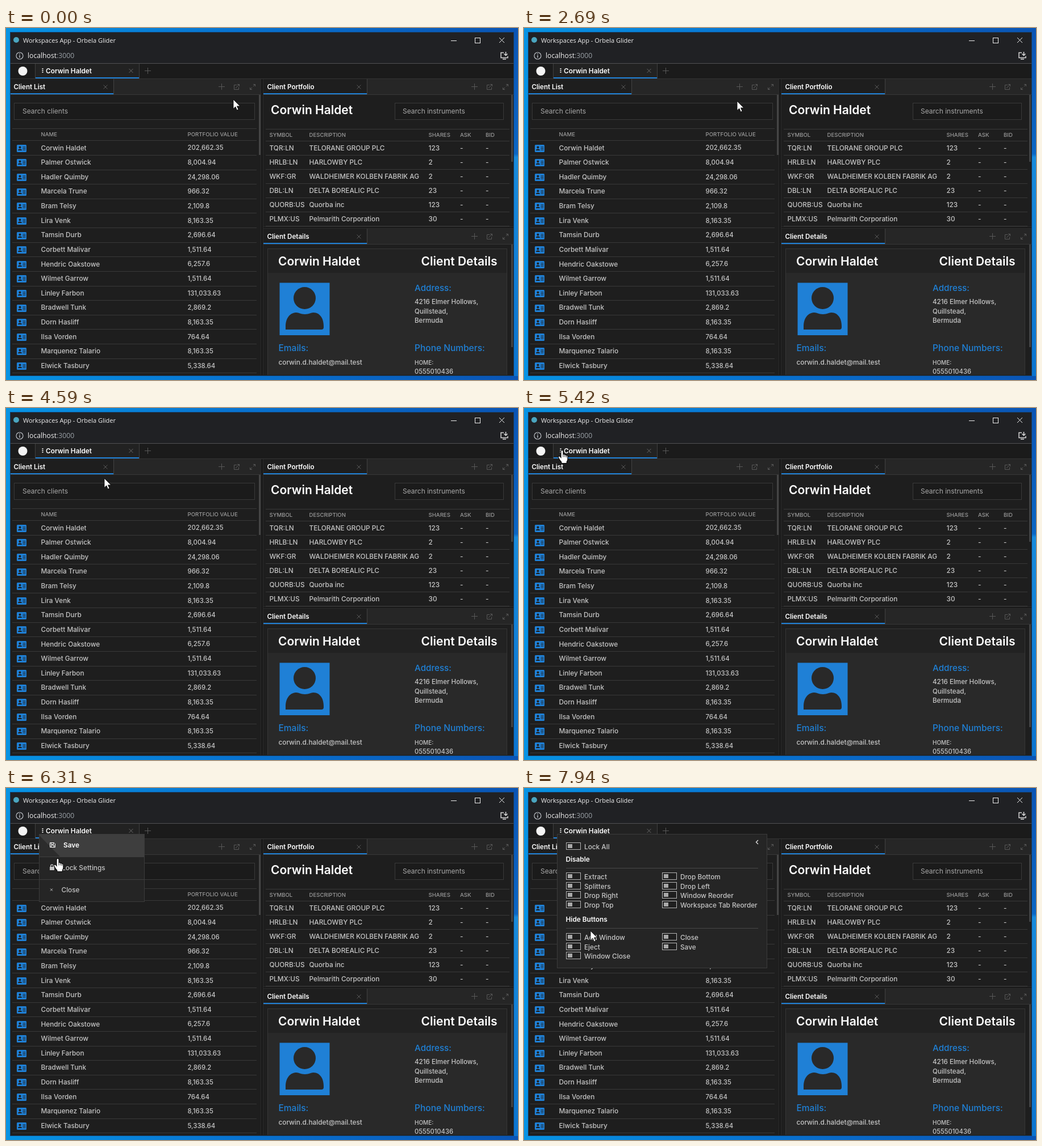
These frames come from a looping animation (901x621 px, 8000 ms). An HTML page:

```html
<!DOCTYPE html>
<html lang="en">
<head>
<meta charset="utf-8">
<title>Workspaces App</title>
<style>
html, body { margin: 0; width: 100%; height: 100%; overflow: hidden; background: #0a6cc8; }
svg { display: block; width: 901px; height: 621px; font-family: Inter, "Open Sans", sans-serif; }
text { white-space: pre; }
.ui { font-family: "Open Sans", "Noto Sans", sans-serif; }
.row > rect, .row > polygon { visibility: hidden; }
.row text { fill: #c4c4c4; font-weight: 500; }
.row .icon { color: #c4c4c4; }
.row.hover > rect, .row.hover > polygon { visibility: inherit; }
.row.hover text { fill: #fff; font-weight: 600; }
.row.hover .icon { color: #fff; }
</style>
</head>
<body>
<svg id="stage" viewBox="0 0 901 621"></svg>
<script>
const BLUE = '#1f80d6', TEXT = '#c6c6c6', DIM = '#9b9b9b', ICON = '#585858', LINE = '#393939';
const stage = document.getElementById('stage');
const CLIENT = 'Corwin Haldet';

const rect = (x, y, w, h, fill, extra = '') =>
  `<rect x="${x}" y="${y}" width="${w}" height="${h}" fill="${fill}" ${extra}/>`;
const frame = (x, y, w, h, fill, stroke, extra = '') =>
  rect(x + .5, y + .5, w - 1, h - 1, fill, `stroke="${stroke}" ${extra}`);
const path = (d, stroke, width = 1, extra = 'fill="none"') =>
  `<path d="${d}" stroke="${stroke}" stroke-width="${width}" ${extra}/>`;
// y is the middle of the capital letters
const text = (x, y, str, size = 11.8, fill = TEXT, weight = 500, extra = '') =>
  `<text x="${x}" y="${(y + size * .36).toFixed(1)}" font-size="${size}" fill="${fill}" font-weight="${weight}" ${extra}>${str}</text>`;
const heading = (x, y, str) => text(x, y, str, 21, '#fff', 600);
const group = (id, body) => `<g id="${id}">${body}</g>`;

const cross = (x, y, r, color, width = 1) =>
  path(`M${x - r} ${y - r}l${2 * r} ${2 * r}m0 ${-2 * r}l${-2 * r} ${2 * r}`, color, width);
const plus = (x, y) => path(`M${x - 5} ${y + .5}h11M${x + .5} ${y - 5}v11`, ICON);
const ejectIcon = (x, y, color) =>
  path(`M${x} ${y - 3.5}h-4.5v8h8v-4M${x - 2} ${y + 2}L${x + 4.5} ${y - 4.5}M${x + 1} ${y - 4.5}h3.5v3.5`, color);
const expandIcon = (x, y) =>
  path(`M${x + 1} ${y - 1}l3.5-3.5m-3.5 0h3.5v3.5M${x - 1} ${y + 1}l-3.5 3.5m0-3.5v3.5h3.5`, ICON);

function wallpaper() {
  return `<defs>
    <linearGradient id="sky"><stop stop-color="#0793e3"/><stop offset=".45" stop-color="#0873d0"/><stop offset="1" stop-color="#0a54b4"/></linearGradient>
    <linearGradient id="edge" x2="0" y2="1"><stop stop-color="#0a55b5"/><stop offset=".35" stop-color="#0b66c4"/><stop offset=".36" stop-color="#188bdc"/><stop offset="1" stop-color="#0b74cf"/></linearGradient>
  </defs>` + rect(0, 0, 901, 621, 'url(#sky)') + rect(893, 7, 8, 614, 'url(#edge)');
}

function browserWindow() {
  return rect(7, 7, 887, 607, '#1e1e1e') + rect(7, 7, 887, 55, '#202124')
    + '<circle cx="18" cy="21" r="5" fill="#4aa5bf"/>'
    + text(30, 21.5, 'Workspaces App - Orbela Glider', 11, '#f0f0f0', 400, 'class="ui"')
    + path('M783 22.5h10', '#eee') + frame(825, 17, 10, 10, 'none', '#eee') + cross(872.5, 21.5, 4.5, '#eee')
    + '<circle cx="24" cy="49" r="6" fill="none" stroke="#bdc1c6" stroke-width="1.2"/>'
    + path('M24 48v4.5M24 45v1.5', '#bdc1c6', 1.4)
    + text(38, 49, 'localhost<tspan fill="#9aa0a6">:3000</tspan>', 12.2, '#f1f1f1', 400, 'class="ui"')
    + path('M876 43.5h-5v9h12v-3M874 55h6M879.5 42v6.5m-3-3l3 3 3-3', '#d5d5d5', 1.5)
    + rect(7, 62, 887, 1, '#515153');
}

function workspaceTabs() {
  return rect(7, 63, 887, 27, '#1b1b1b') + rect(7, 89, 887, 1, '#343434')
    + '<circle cx="29.5" cy="76" r="8" fill="#f4f4f4"/>'
    + rect(51, 63, 184, 26, '#222') + rect(51, 63, 1, 26, '#404040') + rect(234, 63, 1, 26, '#404040')
    + rect(52, 87, 182, 2, BLUE)
    + [71, 74, 77].map(y => rect(63.5, y, 2, 2, '#ddd')).join('')
    + text(70, 75.5, CLIENT, 11.8, '#fff', 600)
    + group('closeHover', '<circle cx="220" cy="75.5" r="8.5" fill="#3c3c3c"/>')
    + cross(220, 75.5, 3.5, '#686868') + plus(249, 75);
}

function panel(x, y, w, tabWidth, title) {
  const right = x + w, mid = y + 14;
  return rect(x, y, w, 28, '#262626') + rect(x, y, tabWidth, 28, '#1e1e1e')
    + rect(x + tabWidth, y, 1, 27, '#424242') + rect(x, y + 27, w, 1, '#383838')
    + rect(x, y + 25, tabWidth, 2, BLUE)
    + text(x + 6.5, mid, title, 11.6, '#fff', 600)
    + cross(x + tabWidth - 14, mid, 3.5, ICON)
    + plus(right - 69, mid - 1) + ejectIcon(right - 42, mid, ICON) + expandIcon(right - 14, mid);
}

const idCard = (x, y) => rect(x, y, 17, 13, BLUE, 'rx="1.5"')
  + `<circle cx="${x + 5.5}" cy="${y + 4.5}" r="1.9" fill="#1e1e1e"/>`
  + path(`M${x + 2} ${y + 10}q0-2.6 3.5-2.6t3.5 2.6z`, 'none', 0, 'fill="#1e1e1e"')
  + path(`M${x + 10.5} ${y + 4}h5m-5 2.5h5m-5 2.5h5`, '#1e1e1e');

function clientList() {
  const clients = `${CLIENT}|202,662.35;Palmer Ostwick|8,004.94;Hadler Quimby|24,298.06;Marcela Trune|966.32;
Bram Telsy|2,109.8;Lira Venk|8,163.35;Tamsin Durb|2,696.64;Corbett Malivar|1,511.64;Hendric Oakstowe|6,257.6;
Wilmet Garrow|1,511.64;Linley Farbon|131,033.63;Bradwell Tunk|2,869.2;Dorn Hasliff|8,163.35;
Ilsa Vorden|764.64;Marquenez Talario|8,163.35;Elwick Tasbury|5,338.64`.split(';').map(r => r.trim().split('|'));
  return panel(7, 90, 441, 182, 'Client List')
    + frame(14, 132, 424, 30, '#1b1b1b', LINE) + text(29, 147, 'Search clients', 12, '#a9a9a9', 400)
    + rect(11, 177, 430, 1, LINE) + rect(11, 198, 430, 1, LINE)
    + text(61.5, 187.5, 'NAME', 9.6, DIM) + text(319.5, 187.5, 'PORTFOLIO VALUE', 9.6, DIM)
    + clients.map(([name, value], i) => {
        const y = 211.3 + i * 25.62;
        return idCard(19, Math.round(y - 5.5)) + text(61.5, y, name) + text(319.5, y, value, 11.4)
          + rect(11, Math.round(y + 12.7), 430, 1, LINE);
      }).join('')
    + rect(445, 118, 3, 106, '#444');
}

function portfolio() {
  const rows = [
    ['TQR:LN', 'TELORANE GROUP PLC', 123], ['HRLB:LN', 'HARLOWBY PLC', 2],
    ['WKF:GR', 'WALDHEIMER KOLBEN FABRIK AG', 2], ['DBL:LN', 'DELTA BOREALIC PLC', 23],
    ['QUORB:US', 'Quorba inc', 123], ['PLMX:US', 'Pelmarith Corporation', 30]];
  const columns = [463.5, 533.5, 743.5, 799, 844];
  return rect(448, 90, 5, 524, '#2b2b2b') + rect(449, 90, 3, 524, '#191919')
    + panel(453, 90, 440, 182, 'Client Portfolio')
    + heading(466, 144.5, CLIENT)
    + frame(684, 132, 192, 30, '#1b1b1b', LINE) + text(698, 147, 'Search instruments', 12, '#a9a9a9', 400)
    + rect(457, 178, 429, 1, LINE) + rect(457, 199, 429, 1, LINE)
    + ['SYMBOL', 'DESCRIPTION', 'SHARES', 'ASK', 'BID'].map((s, i) => text(columns[i], 188.5, s, 9.6, DIM)).join('')
    + rows.map((row, i) => {
        const y = 212 + i * 24.9;
        return [...row, '-', '-'].map((s, c) => text(columns[c], y, s, 11.8)).join('')
          + rect(457, Math.round(y + 12), 429, 1, LINE);
      }).join('')
    + rect(889, 118, 3, 118, '#444') + rect(453, 350, 440, 4, '#2b2b2b') + rect(453, 351, 440, 2, '#191919');
}

function details() {
  return panel(453, 354, 440, 182, 'Client Details')
    + frame(460, 389, 422, 226, '#292929', '#363636') + rect(461, 390, 420, 42, '#222')
    + heading(479, 411.5, CLIENT) + heading(730.5, 411.5, 'Client Details')
    + rect(481.5, 449.5, 88, 92.5, BLUE)
    + '<circle cx="525.5" cy="476.5" r="19.5" fill="#292929"/>'
    + path('M492 532v-6c0-14 8-24 19-24 5 0 7 3 15 3s10-3 15-3c11 0 18 10 18 24v2q0 4-4 4z', 'none', 0, 'fill="#292929"')
    + text(719, 458, 'Address:', 15.2, BLUE)
    + ['4216 Elmer Hollows,', 'Quillstead,', 'Bermuda'].map((s, i) => text(719, 483 + i * 16.6, s, 11.6)).join('')
    + text(479.5, 564.5, 'Emails:', 15.5, BLUE) + text(479.5, 589.5, 'corwin.d.haldet@mail.test', 11.8)
    + text(719, 564.5, 'Phone Numbers:', 15.5, BLUE)
    + text(719, 590, 'HOME:', 10) + text(719, 606, '0555010436', 11.2)
    + rect(889, 382, 3, 181, '#444')
    + rect(7, 612, 887, 2, '#1e1e1e') + rect(0, 614, 901, 7, 'url(#sky)')
    + frame(7, 7, 887, 607, 'none', '#17406a');
}

function menu() {
  const icons = [
    '<path d="M77.500 96.500h7l2 2v6h-9zM79.500 96.500v3h4v-3M79.500 104v-3h5v3" fill="none" stroke="currentColor"/>',
    '<path d="M77 139h8v6h-8z" fill="currentColor"/><path d="M78.700 139v-1.500a2.300 2.300 0 0 1 4.600 0v1.500" fill="none" stroke="currentColor" stroke-width="1.400"/>',
    '<path d="M78 177.500l4 4m0-4l-4 4" stroke="currentColor"/>'];
  return frame(58, 81, 186, 120, '#252525', '#3b3b3b', 'id="menuBox"')
    + ['Save', 'Lock Settings', 'Close'].map((label, i) => {
        const top = 82 + i * 39.5;
        return `<g class="row">${rect(59, top, 184, 39, '#3e3e3e')}`
          + (i ? '' : '<polygon points="59,84 95,121 59,121" fill="#2c2c2c"/>')
          + `<g class="icon">${icons[i]}</g>` + text([101, 98, 97.5][i], 100.7 + i * 39.6, label) + '</g>'
          + (i < 2 ? rect(59, Math.round(top + 39), 184, 1, '#3f3f3f') : '');
      }).join('');
}

function settings() {
  const toggle = (x, y, label) => frame(x, y - 7, 26, 13, '#1f1f1f', '#b5b5b5')
    + rect(x + 3, y - 4, 8, 7, '#a8a8a8') + text(x + 32, y + .5, label);
  const column = (x, y, labels) => labels.map((s, i) => toggle(x, Math.round(y + i * 16.5), s)).join('');
  const section = (y, label) => text(73.5, y, label, 11.8, '#fff', 600) + rect(74, y + 15, 338, 1, '#484848');
  return frame(58, 81, 370, 237, '#252525', '#3b3b3b')
    + path('M412 92l-3.500 3.500 3.500 3.500', '#ddd', 1.4)
    + toggle(74, 103, 'Lock All') + section(126, 'Disable')
    + column(74, 156, ['Extract', 'Splitters', 'Drop Right', 'Drop Top'])
    + column(243, 156, ['Drop Bottom', 'Drop Left', 'Window Reorder', 'Workspace Tab Reorder'])
    + section(232, 'Hide Buttons')
    + column(74, 263, ['Add Window', 'Eject', 'Window Close']) + column(243, 263, ['Close', 'Save']);
}

const tooltip = (id, x, y, w, label) => group(id,
  frame(x, y, w, 23, '#242424', '#9a9a9a') + text(x + 7, y + 12, label, 11.4, '#eee', 400, 'class="ui"'));

stage.innerHTML = wallpaper() + browserWindow() + workspaceTabs() + clientList() + portfolio() + details()
  + group('ejectHover', ejectIcon(406, 104, '#d0d0d0'))
  + group('menu', menu()) + group('settings', settings())
  + tooltip('ejectTip', 412, 121, 39, 'eject') + tooltip('closeTip', 226, 87, 40, 'close')
  + group('click', '<circle r="11.5" fill="#c9c514" fill-opacity=".8"/>')
  + group('arrow', path('M0 0v16.500l3.800-3.600 2.600 6 2.700-1.100-2.600-5.900h5.300z', '#000', .8, 'fill="#fff"'))
  + group('hand', '<g transform="scale(1.1)">'
    + path('M-1.800 1.200q0-1.700 1.800-1.700t1.800 1.700v5q1.800-.7 2.600.6 1.800-.5 2.400 1 2.200-.4 2.200 2v4.700q0 1.500-1.500 3.500v2.500h-8.500v-2q-2.500-2.500-4.500-6.500-1.200-2.200.3-2.800 1.500-.5 3.400 2z', '#000', 1, 'fill="#fff"')
    + path('M1.800 6.500v4m2.600-3.500v3.500m2.400-2.500v3', '#000', .8) + '</g>');

// Each move: first change, last change, number of steps, then evenly timed waypoints.
const moves = [
  [470, 820, 6, [400, 126], [403, 117], [405, 110]],
  [1220, 1220, 1, [405, 110], [404, 109]],
  [2420, 3180, 12, [404, 109], [375, 129], [300, 118], [222, 78]],
  [3250, 3320, 2, [222, 78], [219, 75]],
  [4310, 5070, 12, [219, 75], [190, 126], [120, 118], [77, 86]],
  [5140, 5420, 5, [77, 86], [67, 75]],
  [6030, 6660, 10, [67, 75], [76, 98], [91, 125], [106, 160], [110, 140]],
  [7590, 7940, 6, [110, 140], [130, 185], [129, 225], [117, 252]]];

function cursorAt(time) {
  const move = moves.filter(m => m[0] <= time).pop();
  if (!move) return moves[0][3];
  const [from, to, steps, ...points] = move;
  const step = steps > 1 ? Math.floor((time - from) / (to - from) * (steps - 1) + .001) + 1 : 1;
  const along = Math.min(1, step / steps) * (points.length - 1);
  const i = Math.min(points.length - 2, Math.floor(along));
  return points[i].map((v, axis) => Math.round(v + (points[i + 1][axis] - v) * (along - i)));
}

const byId = id => document.getElementById(id);
const show = (id, on) => { byId(id).style.visibility = on ? 'visible' : 'hidden'; };
const place = (id, x, y) => byId(id).setAttribute('transform', `translate(${x} ${y})`);
const rows = [...document.querySelectorAll('.row')];

function draw() {
  const time = performance.now() % 8000;
  const within = (a, b) => time >= a && time < b;
  const [x, y] = cursorAt(time);
  const menuOpen = within(5690, 6930), settingsOpen = time >= 6930;
  const overEject = Math.abs(x - 406) < 8 && Math.abs(y - 104) < 8;
  const overTabs = y < 90 && x < 259;
  const pointing = !settingsOpen && (menuOpen || overEject || overTabs);

  show('ejectHover', overEject);
  show('closeHover', overTabs && Math.abs(x - 220) < 9 && y < 85);
  show('ejectTip', within(1750, 2420));
  show('closeTip', within(3850, 4310));
  show('menu', menuOpen);
  show('settings', settingsOpen);
  byId('menuBox').setAttribute('height', time < 5760 ? 211 : 119);
  const hovered = Math.floor((y - 87) / 39.5);
  rows.forEach((row, i) => row.classList.toggle('hover', i === hovered));

  show('click', within(5620, 5830) || within(6800, 6930));
  place('click', x - 1, y - 1);
  show('hand', pointing);
  show('arrow', !pointing);
  place('hand', x, y);
  place('arrow', x, y);
  requestAnimationFrame(draw);
}
draw();
</script>
</body>
</html>
```
